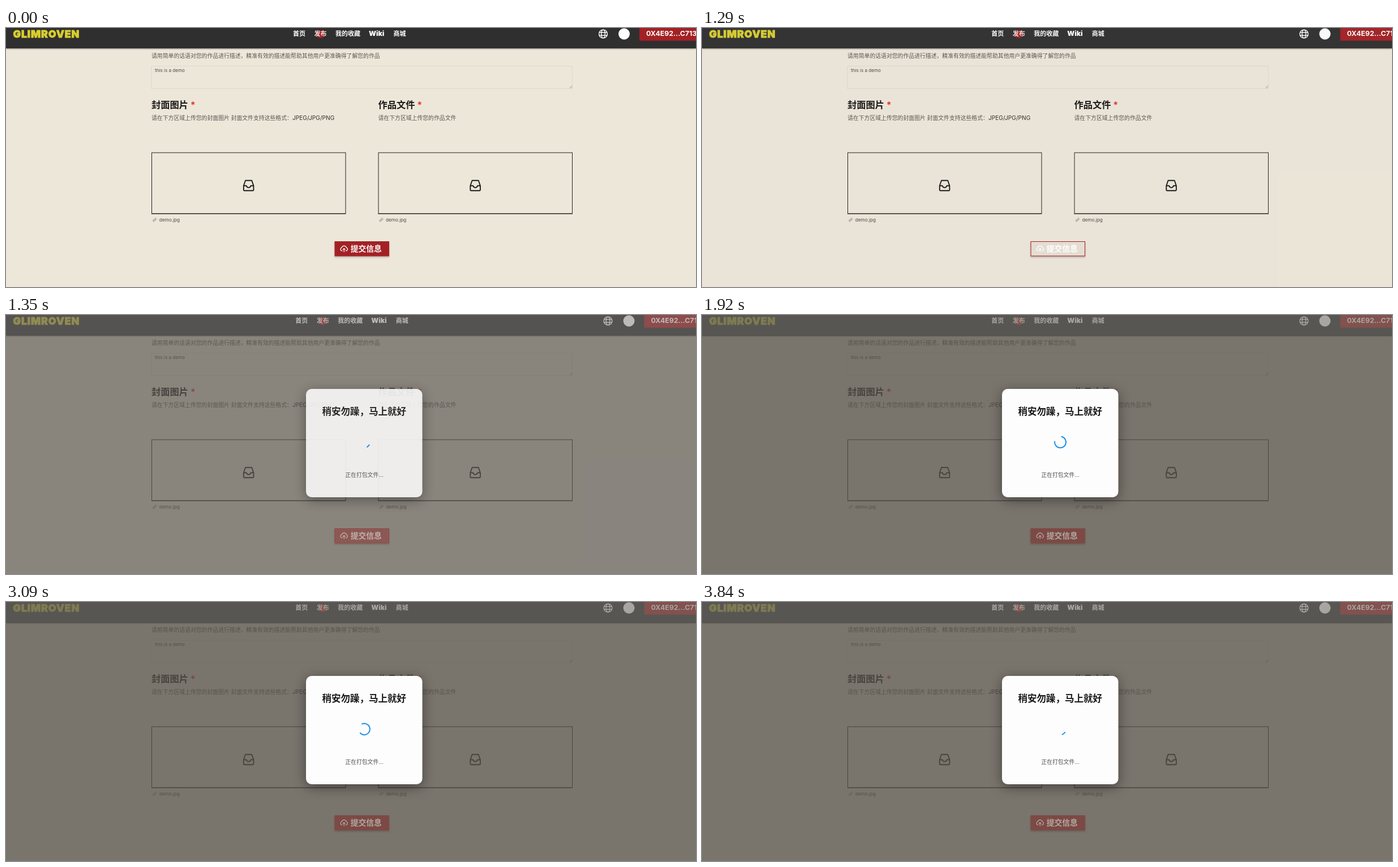
Write an HTML page that moves like this. It is 1219x459 px and loops after 3870 ms.

```html
<!DOCTYPE html>
<html lang="zh-CN">
<head>
<meta charset="utf-8">
<style>
  html, body { margin: 0; width: 100%; height: 100%; overflow: hidden; background: #ede7da; }
  svg { display: block; width: 1219px; height: 459px; }
  text { font-family: Inter, "Noto Sans CJK SC", "Noto Sans CJK", sans-serif; white-space: pre; }
  .line { fill: none; stroke-linecap: round; stroke-linejoin: round; }
  .hint { font-size: 9.85px; fill: #5a5752; }
  .head { font-size: 16.3px; font-weight: 700; fill: #1b1a18; }
  .file { font-size: 8.2px; fill: #4c4a46; }
  .nav { font-size: 11px; font-weight: 700; fill: #fff; }
  .star { fill: #e3201f; font-weight: 500; }
  #card { filter: drop-shadow(0 5px 11px rgba(0, 0, 0, .42)); }
  #bar { filter: drop-shadow(0 1px 1px rgba(0, 0, 0, .45)); }
  #submit { filter: drop-shadow(0 2px 1.5px rgba(60, 40, 30, .28)); }
</style>
</head>
<body>
<svg viewBox="0 0 1219 459">
  <defs>
    <g id="drop">
      <rect x=".5" y=".5" width="342.5" height="108" fill="none" stroke="#24221f"/>
      <path d="M0 108.7H343" stroke="#24221f"/>
      <path class="line" stroke="#1d1c1a" stroke-width="1.9"
        d="M162.8 59L166 49.8H177.2L180.4 59V66.6Q180.4 67.8 179.2 67.8H164Q162.8 67.8 162.8 66.6ZM162.8 59H167.6Q168.6 62.4 171.6 62.4T175.6 59H180.4"/>
    </g>
    <path id="clip" class="line" stroke="#8a867e" stroke-width=".9"
      d="M1 4.6L4.2 1.4Q5.4 .6 6.3 1.6T6 3.6L3 6.6Q1.9 7.4 1 6.6T1 4.6M2.4 5.3L5 2.7"/>
  </defs>

  <rect width="1219" height="459" fill="#ede7da"/>
  <text class="hint" x="257" y="52.5">请用简单的话语对您的作品进行描述，精准有效的描述能帮助其他用户更准确得了解您的作品</text>
  <rect x="257" y="67.5" width="743.5" height="40" fill="none" stroke="#ddd8cc"/>
  <path d="M995.5 106.5L1000 102M998 106.5L1000 104.5" stroke="#8f8b83" stroke-width=".8"/>
  <text x="263" y="78" font-size="8.1" fill="#4c4a46">this is a demo</text>

  <text class="head" x="257" y="142">封面图片 <tspan class="star">*</tspan></text>
  <text class="head" x="657.5" y="142">作品文件 <tspan class="star">*</tspan></text>
  <text class="hint" x="257" y="162.5">请在下方区域上传您的封面图片 封面文件支持这些格式：<tspan fill="#33312e" font-size="10.2">JPEG/JPG/PNG</tspan></text>
  <text class="hint" x="657.5" y="162.5">请在下方区域上传您的作品文件</text>
  <use href="#drop" x="257" y="220.5"/>
  <use href="#drop" x="657.5" y="220.5"/>
  <use href="#clip" x="259" y="336"/>
  <text class="file" x="270.7" y="342.5">demo.jpg</text>
  <g id="second">
    <use href="#clip" x="659.3" y="336"/>
    <text class="file" x="671" y="342.5">demo.jpg</text>
  </g>
  <rect id="pageMask" y="36" width="1219" height="423"/>

  <g id="submit">
    <rect id="face" x="581" y="378.5" width="95.5" height="25.5"/>
    <g id="label">
      <path class="line" stroke="currentColor" stroke-width="1.2"
        d="M594.4 395H593.6A3 3 0 0 1 593 389.2A4.4 4.4 0 0 1 601.4 389.2A3 3 0 0 1 600.8 395H600M597.2 396.6V390.8M595.2 392.6L597.2 390.6L599.2 392.6"/>
      <text x="608.7" y="395.6" font-size="13.8" font-weight="700" fill="currentColor">提交信息</text>
    </g>
  </g>

  <g id="bar">
    <rect y="-4" width="1219" height="40" fill="#2f2f2f"/>
    <text id="brand" x="12.5" y="17" font-size="18" font-weight="900" letter-spacing=".8" fill="#d9cd2f" stroke="#d9cd2f" stroke-width=".8">GLIMROVEN</text>
    <g id="menu">
      <circle cx="555.3" cy="11" r="7" fill="#a32125"/>
      <text class="nav" x="507" y="14.2">首页</text>
      <text class="nav" x="544.5" y="14.2" style="fill:#f6dcda">发布</text>
      <text class="nav" x="582" y="14.2">我的收藏</text>
      <text class="nav" x="641" y="14.2" style="font-size:12px;font-weight:900">Wiki</text>
      <text class="nav" x="684.5" y="14.2">商城</text>
    </g>
    <g id="tools">
      <g class="line" stroke="#fff" stroke-width="1.4">
        <circle cx="1055" cy="10.5" r="7.4"/>
        <ellipse cx="1055" cy="10.5" rx="3.3" ry="7.4"/>
        <path d="M1048.4 8H1061.6M1048.4 13H1061.6"/>
      </g>
      <circle cx="1092" cy="10.5" r="10" fill="#fff"/>
      <rect x="1119" y="-4" width="120" height="26.5" fill="#a32125"/>
      <text x="1131" y="14.3" font-size="12.3" font-weight="700" fill="#fff">0X4E92...C713</text>
    </g>
  </g>
  <rect id="barMask" width="1219" height="36"/>

  <g id="modal">
    <rect id="card" x="530" y="131" width="205.5" height="192" rx="10" fill="#fdfdfd"/>
    <text x="632.8" y="177" font-size="16.5" font-weight="700" fill="#1a1a1a" text-anchor="middle">稍安勿躁，马上就好</text>
    <circle id="spinner" class="line" cx="633" cy="225.3" r="10" stroke="#1a90ea" stroke-width="2" pathLength="360"/>
    <text x="633" y="286.6" font-size="9.85" fill="#4f4f4f" text-anchor="middle">正在打包文件...</text>
  </g>
</svg>
<script>
const LOOP = 3870, STEP = 30, OPEN = 1281, SPIN = 1240;
const RED = [163, 33, 37], WHITE = [255, 255, 255], PALE = [229, 221, 210];
const el = id => document.getElementById(id);
const rgb = c => `rgb(${c.slice(0, 3)})`;

// Each key is [time, ...values]; values are interpolated linearly.
function track(t, keys) {
  const i = keys.findIndex(k => k[0] > t);
  if (i === 0) return keys[0].slice(1);
  if (i < 0) return keys[keys.length - 1].slice(1);
  const a = keys[i - 1], b = keys[i], p = (t - a[0]) / (b[0] - a[0]);
  return a.slice(1).map((v, n) => v + (b[n + 1] - v) * p);
}

const fade = [[1290, 0], [1320, .53], [1350, .87], [1380, 1]];
const pageMask = [[1260, 122, 118, 114, 0], [1290, 122, 118, 114, .02], [1320, 122, 118, 114, .55],
  [1350, 90, 87, 82, .68], [1380, 86, 81, 74, .76]];
const barMask = [[1260, 138, 136, 131, 0], [1290, 138, 136, 131, .05], [1320, 138, 136, 131, .47],
  [1350, 123, 121, 116, .5], [1380, 113, 111, 105, .615]];
const face = [[810, ...RED], [1020, ...PALE], [1290, ...PALE], [1320, 162, 147, 138],
  [1350, 141, 88, 84], [1380, 125, 73, 68]];
const edge = [[1290, ...RED], [1320, 168, 90, 86], [1350, 141, 75, 71], [1380, 125, 73, 68]];
const label = [[1290, ...WHITE], [1320, 205, 201, 196], [1350, 190, 178, 172], [1380, 176, 170, 164]];

function setMask(id, [r, g, b, a]) {
  el(id).setAttribute('fill', `rgba(${r},${g},${b},${a})`);
}

function spin(t) {
  const p = (t - OPEN) / SPIN % 1;
  const tail = p < .5 ? 540 * p : 270 + 900 * (p - .5);
  const arc = 270 * (1 - Math.abs(1 - 2 * p));
  el('spinner').setAttribute('stroke-dasharray', `${arc} 360`);
  el('spinner').setAttribute('transform', `rotate(${tail} 633 225.3)`);
}

function draw(now) {
  const t = Math.floor(now % LOOP / STEP) * STEP;
  // The scrollbar disappears when the dialog opens, so the header widens.
  const shift = t > OPEN ? 8.5 : 0;
  el('menu').setAttribute('transform', `translate(${shift / 2})`);
  el('tools').setAttribute('transform', `translate(${shift})`);
  el('second').setAttribute('transform', `translate(${track(t, [[510, 0], [630, .5]])})`);
  setMask('pageMask', track(t, pageMask));
  setMask('barMask', track(t, barMask));
  el('face').setAttribute('fill', rgb(track(t, face)));
  el('face').setAttribute('stroke', rgb(track(t, edge)));
  el('label').style.color = rgb(track(t, label));
  el('brand').setAttribute('opacity', track(t, [[1290, 1], [1320, .83], [1380, .6]]));
  el('modal').setAttribute('opacity', track(t, fade));
  if (t > OPEN) spin(t);
  requestAnimationFrame(() => draw(performance.now() - start));
}

const start = performance.now();
draw(0);
</script>
</body>
</html>
```
